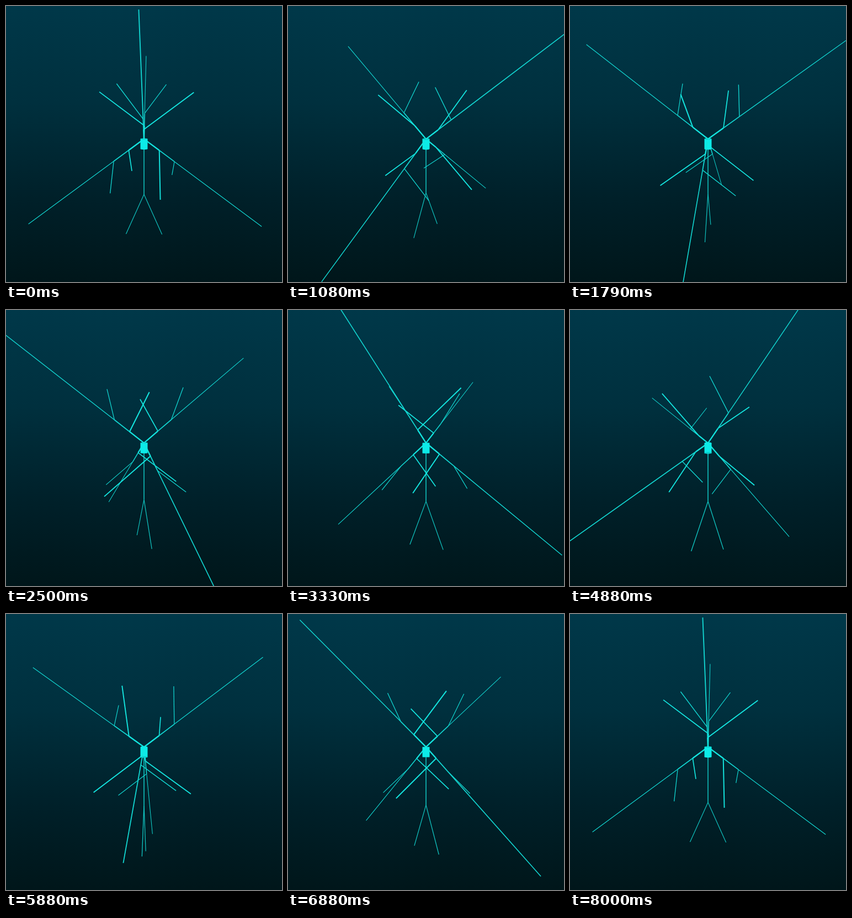
Recreate the animation shown at these times as an HTML page. Size 500 by 500 pixels, loop 8040 ms.

```html
<!DOCTYPE html>
<html lang="en">
<head>
<meta charset="utf-8">
<title>Orbiting tree</title>
<style>
html, body { margin: 0; width: 100%; height: 100%; overflow: hidden; background: #002a36; }
svg { display: block; width: 100vw; height: 100vh; }
line { stroke-linecap: butt; }
</style>
</head>
<body>
<svg viewBox="0 0 500 500">
  <defs>
    <linearGradient id="sky" x1="0" y1="0" x2="0" y2="1">
      <stop offset="0" stop-color="#003849"/>
      <stop offset=".35" stop-color="#00303e"/>
      <stop offset=".7" stop-color="#002029"/>
      <stop offset="1" stop-color="#00161a"/>
    </linearGradient>
  </defs>
  <rect width="500" height="500" fill="url(#sky)"/>
  <g id="back"></g>
  <path id="barrel" fill="#0cebe8"/>
  <ellipse id="cap" fill="#08cfcd"/>
  <g id="front"></g>
</svg>
<script>
const LOOP = 8040, FPS = 24, TURN = 192;
const RAD = Math.PI / 180;
const DIST = 549, UNIT = 34.75, HUB = 9.2, HUB_RADIUS = 6.5;
const ORBIT_TILT = 15 * RAD;

const $ = id => document.getElementById(id);
const back = $('back'), front = $('front'), barrel = $('barrel'), cap = $('cap');
const sticks = [];

// Points are cylindrical around the trunk: out (radial), up, side (tangential).
function stick(azimuth, from, to, width, color) {
  const el = document.createElementNS('http://www.w3.org/2000/svg', 'line');
  el.setAttribute('stroke', color);
  back.append(el);
  sticks.push({ el, azimuth: azimuth * RAD, from, to, width });
}

const BRIGHT = '#14e6e0', MID = '#12d6d1', DIM = '#10c2bf';

function arm(azimuth, sign, innerDir, outerDir) {
  const along = n => [.8 * n * UNIT, HUB + sign * .6 * n * UNIT, 0];
  const grow = (p, [up, side], n) => [p[0], p[1] + up * n * UNIT, p[2] + side * n * UNIT];
  const start = along(sign > 0 ? 0 : .2);
  stick(azimuth, start, along(1), 2.3, BRIGHT);
  stick(azimuth, along(1), along(2), 1.7, MID);
  stick(azimuth, along(2), along(8), 1.25, MID);
  stick(azimuth, along(1), grow(along(1), innerDir, 3), 1.8, BRIGHT);
  stick(azimuth, along(2), grow(along(2), outerDir, 2), 1.25, MID);
}

for (const half of [0, 180]) {
  arm(half, 1, [.6, .8], [.8, -.6]);
  arm(half - 90, -1, [-.6, -.8], [-.6, .8]);
  stick(half - 90, [0, -95.7, 0], [34.5, -176, 0], 1.25, DIM);
}
stick(0, [0, -HUB, 0], [0, -95.7, 0], 1.4, MID);

function camera(frame) {
  const u = (45 + 360 * frame / TURN) * RAD;
  const azimuth = Math.atan2(Math.cos(ORBIT_TILT) * Math.sin(u), Math.cos(u));
  const drift = .8 * Math.sin(4 * u - Math.PI) * RAD;
  return {
    yaw: 135.35 * RAD - azimuth - drift,
    pitch: Math.asin(Math.sin(ORBIT_TILT) * Math.sin(u))
  };
}

function project([out, up, side], azimuth, pitch) {
  const ca = Math.cos(azimuth), sa = Math.sin(azimuth);
  const cp = Math.cos(pitch), sp = Math.sin(pitch);
  const x = out * ca + side * sa, z = out * sa - side * ca;
  const depth = up * sp + z * cp;
  const scale = DIST / (DIST - depth);
  return { x: 250 + x * scale, y: 250 - (up * cp - z * sp) * scale, z, scale };
}

function set(el, attrs) {
  for (const key in attrs) el.setAttribute(key, attrs[key]);
}

function drawHub(pitch) {
  const top = project([0, HUB, 0], 0, pitch), low = project([0, -HUB, 0], 0, pitch);
  const rx = HUB_RADIUS, ry = rx * Math.abs(Math.sin(pitch));
  barrel.setAttribute('d',
    `M${250 - rx} ${top.y}A${rx} ${ry} 0 0 1 ${250 + rx} ${top.y}` +
    `V${low.y}A${rx} ${ry} 0 0 1 ${250 - rx} ${low.y}Z`);
  set(cap, { cx: 250, cy: pitch > 0 ? top.y : low.y, rx, ry });
}

function draw(frame) {
  const { yaw, pitch } = camera(frame);
  for (const s of sticks) {
    const a = project(s.from, yaw + s.azimuth, pitch);
    const b = project(s.to, yaw + s.azimuth, pitch);
    set(s.el, {
      x1: a.x, y1: a.y, x2: b.x, y2: b.y,
      'stroke-width': s.width * (a.scale + b.scale) / 2
    });
    const layer = a.z + b.z > 0 ? front : back;
    if (s.el.parentNode !== layer) layer.append(s.el);
  }
  drawHub(pitch);
}

const begin = performance.now();
function tick() {
  const t = (performance.now() - begin) % LOOP;
  draw(Math.min(TURN, Math.floor((t + 5) * FPS / 1000)));
  requestAnimationFrame(tick);
}
tick();
</script>
</body>
</html>
```
